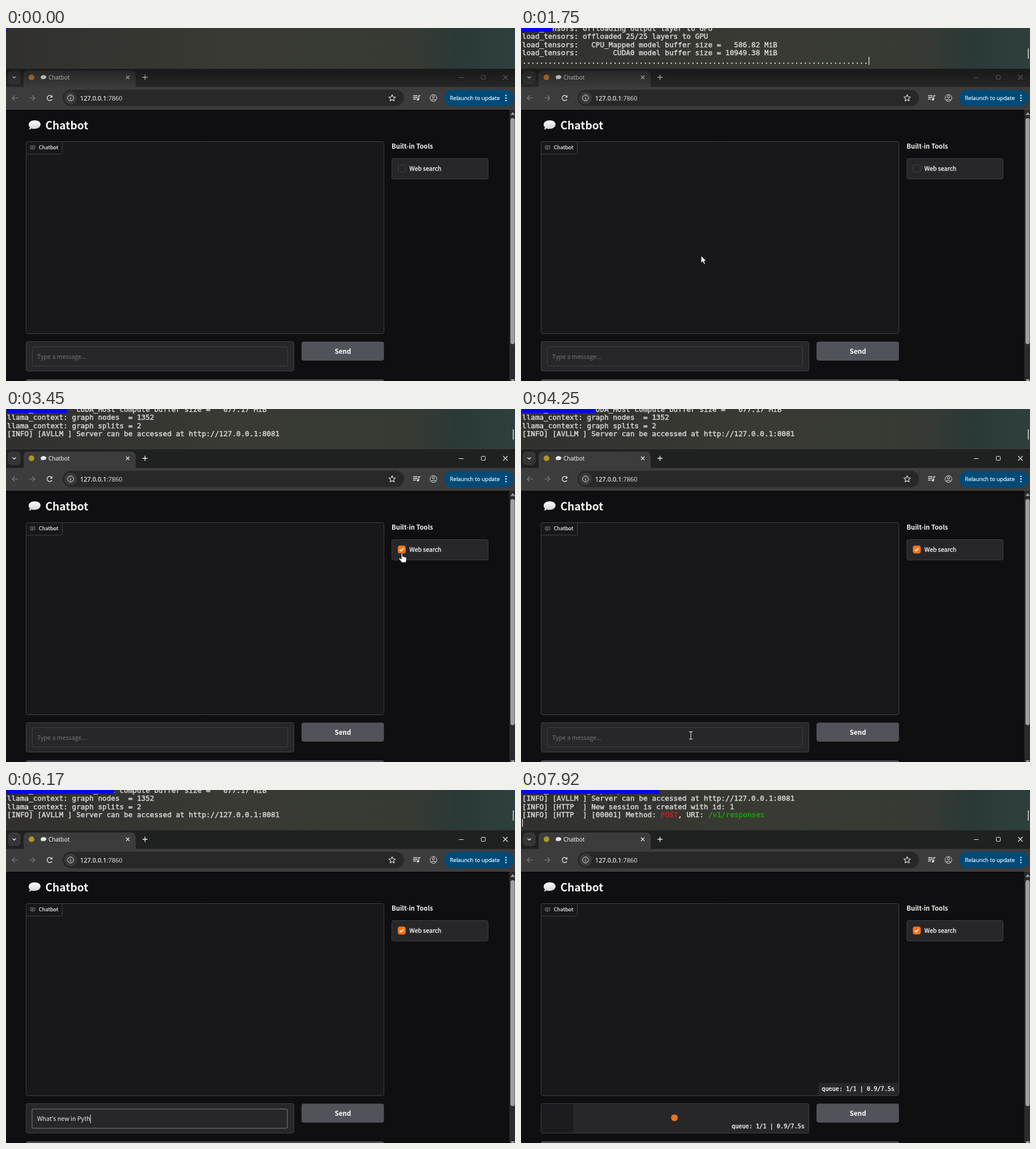
An HTML page with a canvas for the animation above (8000 ms loop, 899x623 px).

```html
<!DOCTYPE html>
<html lang="en">
<head>
<meta charset="utf-8">
<title>Chatbot</title>
<style>
  html, body { margin: 0; width: 100%; height: 100%; overflow: hidden; background: #0f0f11; }
  canvas { display: block; width: 899px; height: 623px; }
</style>
</head>
<body>
<canvas id="stage" width="899" height="623"></canvas>
<script>
const ctx = document.getElementById('stage').getContext('2d');
const LOOP = 8000;
const MONO = '"DejaVu Sans Mono", monospace';
const CHROME = '"Open Sans", "Noto Sans", sans-serif';
const PAGE = '"Noto Sans CJK JP", "Noto Sans CJK SC", "Noto Sans CJK", "Noto Sans", sans-serif';
const CHAR = 7.65, LINE = 14.4;
const PANEL = '#27272a', EDGE = '#3f3f46', ORANGE = '#f97316';
const PROMPT = "What's new in Python 3.14?";

// Moments at which the state changes, in ms
const AT = { log: 170, activate: 2080, check: 3180, focus: 4500, type: 5230,
             typed: 6650, send: 6960, reply: 7420 };

// Pointer stops: time, x, y
const POINTER = [[100, 155, 587], [1350, 155, 587], [1680, 318, 402], [2230, 318, 402],
                 [2950, 699, 254], [3500, 699, 254], [4150, 300, 572], [4480, 300, 588],
                 [4700, 300, 600], [4950, 300, 600]];

const LOAD_LOG = [
  'load_tensors: offloading output layer to GPU',
  'load_tensors: offloaded 25/25 layers to GPU',
  'load_tensors:   CPU_Mapped model buffer size =   586.82 MiB',
  'load_tensors:        CUDA0 model buffer size = 10949.38 MiB'];
const READY_LOG = [
  'llama_context:  CUDA_Host compute buffer size =   677.17 MiB',
  'llama_context: graph nodes  = 1352',
  'llama_context: graph splits = 2',
  '[INFO] [AVLLM ] Server can be accessed at http://127.0.0.1:8081', ''];
const REPLY_LOG = [
  ...READY_LOG.slice(2, 4),
  '[INFO] [HTTP  ] New session is created with id: 1',
  '[INFO] [HTTP  ] [00001] Method: POST, URI: /v1/responses', ''];

const clamp = (v, lo = 0, hi = 1) => Math.min(hi, Math.max(lo, v));
const ramp = (t, from, to) => clamp((t - from) / (to - from));
const mix = (a, b, k) => a + (b - a) * k;
const grey = v => `rgb(${v},${v},${v})`;

// heft thickens the strokes of the letters without changing their advance
function text(str, x, y, font, color, heft = 0) {
  ctx.font = font;
  ctx.fillStyle = ctx.strokeStyle = color;
  ctx.fillText(str, x, y);
  if (heft) {
    ctx.lineWidth = heft;
    ctx.strokeText(str, x, y);
  }
}

function box(x, y, w, h, r, fill, edge, width = 1) {
  ctx.beginPath();
  ctx.roundRect(x, y, w, h, r);
  if (fill) { ctx.fillStyle = fill; ctx.fill(); }
  if (edge) { ctx.strokeStyle = edge; ctx.lineWidth = width; ctx.stroke(); }
}

function disc(x, y, r, fill, edge) {
  box(x - r, y - r, 2 * r, 2 * r, r, fill, edge);
}

function path(d, x, y, { fill, edge, width = 1.2, scale = 1 }) {
  const shape = new Path2D(d);
  ctx.save();
  ctx.translate(x, y);
  ctx.scale(scale, scale);
  ctx.lineWidth = width;
  ctx.lineJoin = 'round';
  if (fill) { ctx.fillStyle = fill; ctx.fill(shape); }
  if (edge) { ctx.strokeStyle = edge; ctx.stroke(shape); }
  ctx.restore();
}

function bubble(x, y, scale) {
  const shade = ctx.createLinearGradient(0, -8, 0, 8);
  shade.addColorStop(0, '#fff');
  shade.addColorStop(1, '#cdd2d8');
  path('M-10 0C-10-5-6-8 1-8C7-8 11-5 11-1C11 4 6 7 0 7C-2 7-4 7-5 6C-6 8-8 8-10 8C-8 7-8 5-8 4C-9 3-10 2-10 0Z',
    x, y, { fill: shade, scale });
}

function terminal(t) {
  const wall = ctx.createLinearGradient(0, 0, 899, 40);
  [[0, '#31302e'], [.45, '#383a33'], [.8, '#373a34'], [.88, '#2a3938'], [1, '#2e403d']]
    .forEach(([stop, color]) => wall.addColorStop(stop, color));
  ctx.fillStyle = wall;
  ctx.fillRect(0, 0, 899, 73);

  let lines = [];
  if (t >= AT.reply) lines = REPLY_LOG;
  else if (t >= 1780) lines = READY_LOG;
  else if (t >= AT.log) {
    const dots = 69 * ramp(t, 300, 1000) + 11 * ramp(t, 1000, 1690);
    lines = [...LOAD_LOG, '.'.repeat(Math.floor(dots))];
  }
  const font = `12.7px ${MONO}`;
  lines.forEach((line, row) => {
    const y = 5 + row * LINE;
    text(line, 2, y, font, '#d4d4d4', .5);
    for (const [word, color] of [['POST', '#c0202a'], ['/v1/responses', '#16a50e']]) {
      const at = line.indexOf(word);
      if (at < 0) continue;
      ctx.fillStyle = wall;
      ctx.fillRect(2 + at * CHAR, y - 11, word.length * CHAR, 14);
      text(word, 2 + at * CHAR, y, font, color, .5);
    }
  });

  if (lines.length) {
    ctx.fillStyle = '#b4b4b4';
    ctx.fillRect(895, 36, 2, 18);
    if (t < 2300 || t >= AT.reply) {
      ctx.fillStyle = '#eee';
      ctx.fillRect(2 + lines[4].length * CHAR, 51, 1.2, 14);
    }
  }
  ctx.fillStyle = '#0505f5';
  ctx.fillRect(1, 0, 1 + .0306 * t, 7);
}

function browser(t) {
  const active = ramp(t, AT.activate, AT.activate + 180);
  const top = active ? 70 : 72;
  const ink = grey(Math.round(mix(205, 235, active)));
  const controls = grey(Math.round(mix(115, 240, active)));
  ctx.fillStyle = active ? '#1f2020' : '#282828';
  ctx.fillRect(0, top, 899, 74);
  ctx.fillStyle = active ? '#3a3c3b' : '#2d2d2d';
  ctx.fillRect(0, top, 899, 1);

  box(3, 75, 23, 24, 7, '#363636');
  path('M-3-1.5L0 1.5L3-1.5', 14.5, 87, { edge: ink, width: 1.4 });
  box(31, 75, 198, 40, 8, '#3c3c3c');
  ctx.fillStyle = '#3c3c3c';
  ctx.fillRect(0, 104, 899, 39);
  disc(45, 87, 5, active ? '#ad971c' : '#c77b2b');
  bubble(66, 87, .47);
  text('Chatbot', 75, 91, `10px ${CHROME}`, ink, .15);
  path('M-3-3L3 3M3-3L-3 3', 215, 87, { edge: ink });
  path('M-4.5 0H4.5M0-4.5V4.5', 245.5, 87, { edge: ink, width: 1.4 });
  path('M-4 0H4', 804, 87.5, { edge: controls, width: 1 });
  box(839.5, 83.5, 7, 7, 1, null, controls);
  path('M-4-4L4 4M4-4L-4 4', 882, 87, { edge: controls, width: 1.1 });

  // An unfocused window is dimmed towards its top edge
  const shade = ctx.createLinearGradient(0, 72, 0, 106);
  shade.addColorStop(0, `rgba(0,0,0,${.4 * (1 - active)})`);
  shade.addColorStop(1, 'rgba(0,0,0,0)');
  ctx.fillStyle = shade;
  ctx.fillRect(0, 72, 899, 34);

  const arrow = 'M5 0H-4.5M-.5-4.5L-5 0L-.5 4.5';
  path(arrow, 16, 123.5, { edge: '#7d7d7d' });
  ctx.save();
  ctx.translate(46, 123.5);
  ctx.scale(-1, 1);
  path(arrow, 0, 0, { edge: '#7d7d7d' });
  ctx.restore();
  path('M4 2.5A4.5 4.5 0 1 1 3.5-3', 77, 123.5, { edge: '#dedede', width: 1.4 });
  path('M5-5V-.8H.8Z', 77, 123.5, { fill: '#dedede' });
  box(100, 109, 603, 29, 14.5, '#282828');
  disc(114, 123.5, 11, '#3a3a3a');
  disc(114, 123.5, 5.3, null, '#dedede');
  path('M0-2.8V-1.4M0-.3V3', 114, 123.5, { edge: '#dedede', width: 1.3 });
  text('127.0.0.1', 131, 127.5, `11px ${CHROME}`, '#f0f0f0', .25);
  const hostWidth = ctx.measureText('127.0.0.1').width;
  text(':7860', 131 + hostWidth, 127.5, `11px ${CHROME}`, '#cfcfcf', .15);
  path('M0-5.8L1.7-2L5.8-1.6L2.7 1.1L3.6 5.2L0 3L-3.6 5.2L-2.7 1.1L-5.8-1.6L-1.7-2Z',
    682, 123.5, { edge: '#dedede' });
  path('M-6-4H2M-6-1H2M-6 2H-1M4 2.5V-4H7', 725, 123.5, { edge: '#dedede', width: 1.4 });
  disc(727.5, 126, 2, '#dedede');
  disc(755, 123.5, 6, null, '#dedede');
  disc(755, 121.5, 2, null, '#dedede');
  path('M-4 4Q0 .5 4 4', 755, 123.5, { edge: '#dedede' });
  box(774, 109, 122, 29, 14.5, '#004a77');
  text('Relaunch to update', 784, 127, `9.7px ${CHROME}`, '#d9eeff', .3);
  for (const dy of [-4.5, 0, 4.5]) disc(883, 123.5 + dy, 1.3, '#e4f2ff');
}

function loadingStatus(t) {
  const seconds = Math.max(0, (t - AT.send - 50) / 1000);
  const label = `queue: 1/1 | ${(Math.floor(seconds * 10) / 10).toFixed(1)}/7.5s`;
  const font = `10.2px ${MONO}`;
  box(525, 517, 142, 22, [4, 0, 3, 0], PANEL);
  text(label, 531, 530.5, font, '#f4f4f5', .4);
  box(36, 554, 56 * ramp(t, 7080, 7650), 51, 0, '#1c1b20');
  disc(271, 578.5, 6, '#e8731e');
  text(label, 372, 597, font, '#f4f4f5', .4);
}

function messageInput(t) {
  const focused = t >= AT.focus;
  if (focused) box(46, 563, 451, 34, 3, PANEL, '#52525b', 2);
  else box(46.5, 562.5, 451, 34, 3, PANEL, EDGE);
  const typed = PROMPT.slice(0, Math.ceil(PROMPT.length * ramp(t, AT.type, AT.typed)));
  text(typed || 'Type a message...', 55, 584, `10.65px ${PAGE}`, typed ? '#f4f4f5' : '#71717a');
  const blinkOn = t < AT.type ? (t - AT.focus) % 1060 < 640 : true;
  if (focused && blinkOn) {
    ctx.fillStyle = '#f4f4f5';
    ctx.fillRect(55 + (typed ? ctx.measureText(typed).width : 0), 573, 1, 15);
  }
}

function page(t) {
  ctx.fillStyle = '#0f0f11';
  ctx.fillRect(0, 143, 889, 480);
  ctx.fillStyle = '#4a4a4a';
  ctx.fillRect(0, 143, 899, 1);
  ctx.fillStyle = '#2b2b2d';
  ctx.fillRect(889, 144, 10, 479);
  path('M-4 2.5L0-2.5L4 2.5Z', 895, 151, { fill: '#a0a0a0' });
  path('M-4-1H4L0 4Z', 895, 621, { fill: '#a0a0a0' });
  box(891, 159, 7.5, 399, 3.7, '#9f9f9f');

  bubble(50, 171, 1);
  text('Chatbot', 69.5, 179, `600 19.2px ${PAGE}`, '#f8f8f9');

  box(35.5, 200.5, 632, 339, 3, '#18181a', EDGE);
  box(35.5, 200.5, 64, 22, [3, 0, 3, 0], '#18181a', EDGE);
  path('M-4-3H4V2H1L-1 4V2H-4ZM-2-1H2M-2 .7H1', 47, 211, { edge: '#85858d', width: .9 });
  text('Chatbot', 58, 214, `500 9.2px ${PAGE}`, '#f4f4f5', .2);

  text('Built-in Tools', 681, 212.5, `600 11.3px ${PAGE}`, '#f4f4f5');
  box(681.5, 230.5, 170, 36, 3, PANEL, EDGE);
  const checked = t >= AT.check;
  box(692.5, 241.5, 13, 13, 3, checked ? ORANGE : PANEL, checked ? ORANGE : EDGE);
  if (checked) path('M-3.5 .2L-1.2 2.5L3.5-2.5', 699, 248, { edge: '#fff', width: 1.8 });
  text('Web search', 712.5, 252, `500 10.6px ${PAGE}`, '#f4f4f5', .3);

  box(35.5, 553.5, 473, 52, 3, PANEL, EDGE);
  if (t >= AT.send) loadingStatus(t);
  else messageInput(t);
  box(522, 553.5, 145.5, 33.5, 4, '#52525b');
  text('Send', 580.5, 575, `600 11.6px ${PAGE}`, '#fff');
  box(35, 620, 633, 10, 4, '#4a4a52');
}

function pointer(t) {
  const next = POINTER.findIndex(stop => stop[0] > t);
  if (next < 1) return;
  const [from, to] = [POINTER[next - 1], POINTER[next]];
  const k = ramp(t, from[0], to[0]);
  const eased = k * k * (3 - 2 * k);
  const x = mix(from[1], to[1], eased), y = mix(from[2], to[2], eased);

  if (t > 2040 && t < 2220) disc(318, 400.5, 10.3, '#8d8514');
  const overInput = x > 46 && x < 497 && y > 562 && y < 602;
  const overCheck = x > 685 && y > 235 && y < 267;
  if (overInput) {
    path('M-3-6.5H-1L0-6L1-6.5H3M0-6V6M-3 6.5H-1L0 6L1 6.5H3', x, y + .5, { edge: '#e4e4e4', width: 1.1 });
  } else if (overCheck) {
    path('M-1 1Q0-1 1.5 1V6L7 7.5Q9 8 8.5 11L7.5 17H0L-5 10.5Q-5 8.5-3 9L-1 11Z',
      x, y, { fill: '#fff', edge: '#111', width: 1 });
  } else {
    path('M0 0V13L3 10L5.2 15L7.5 14L5.3 9.2H9.5Z', x, y, { fill: '#fff', edge: '#111', width: .9 });
  }
}

function render(now) {
  const t = now % LOOP;
  terminal(t);
  browser(t);
  page(t);
  pointer(t);
  requestAnimationFrame(render);
}
requestAnimationFrame(render);
</script>
</body>
</html>
```
